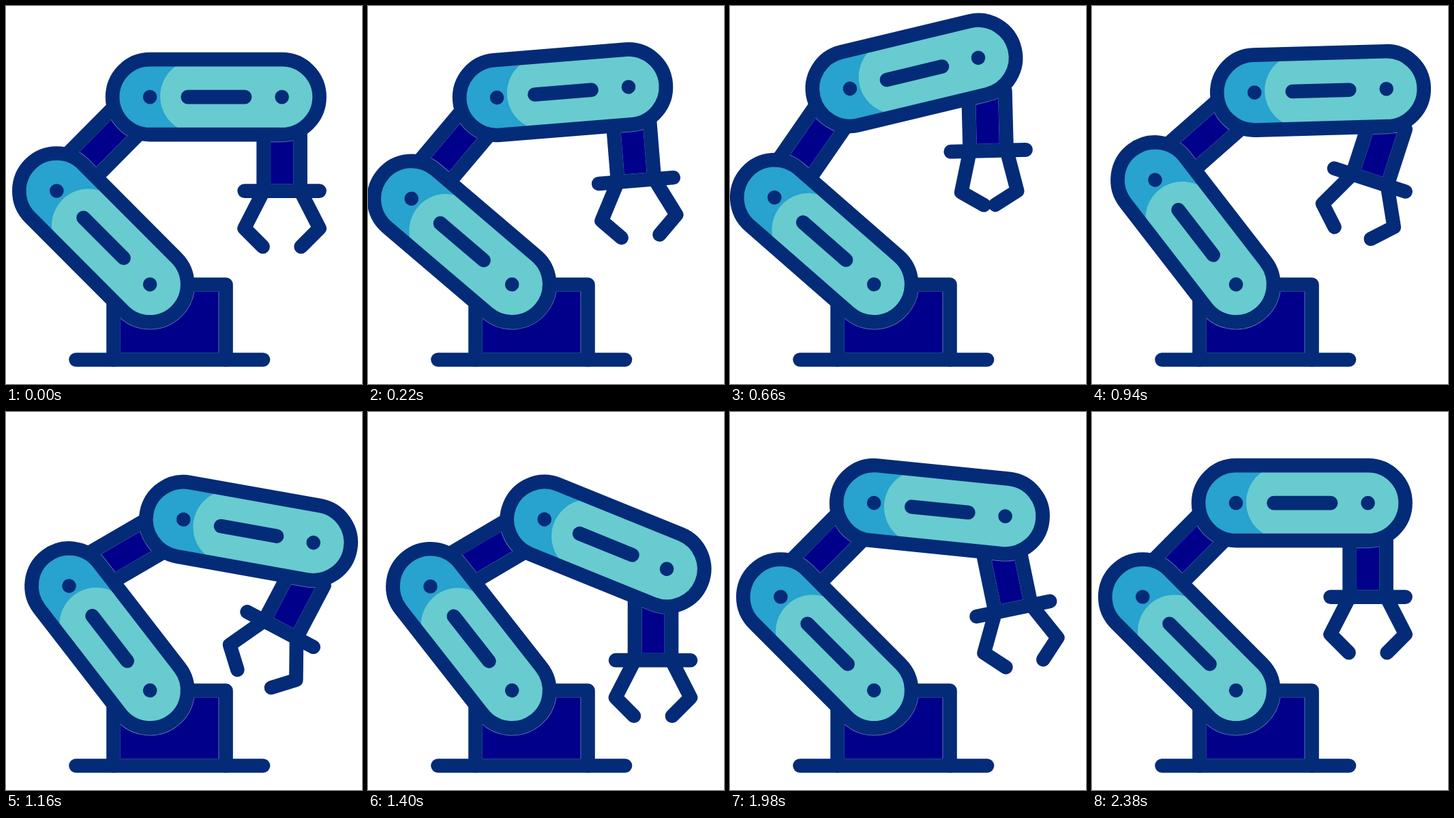
An HTML page with a canvas that plays this animation: 522 by 553 pixels, repeating every 2.4 s.

```html
<!DOCTYPE html>
<html>
<head>
<meta charset="utf-8">
<title>Robot arm</title>
<style>
html, body { margin: 0; width: 100%; height: 100%; overflow: hidden; background: #fff; }
canvas { display: block; }
</style>
</head>
<body>
<canvas id="stage" width="522" height="553"></canvas>
<script>
const ctx = document.getElementById('stage').getContext('2d');
const LOOP = 2400, ARM = 193.5, RADIUS = 55, LINE = 20.6;
const NAVY = '#042b77', DARK = '#00008b', TEAL = '#67cbd0', BLUE = '#28a2ce', EDGE = '#7580bb';

// The arm makes three strokes; each joint follows the one before it by a lag
const strokes = [
  { start: 0, span: 280, lag: 238, lower: -5.2, link: -6.2, upper: -5.5, grip: 19.6 },
  { start: 595, span: 330, lag: 250, lower: 7.2, link: 7.9, upper: 8.1, grip: -24.6 },
  { start: 1345, span: 400, lag: 235, lower: 0, link: 0, upper: 0, grip: 0 }
];
const lags = { lower: 0, link: 1, upper: 2.1, grip: 2.1 };

function ease(u) {
  u = Math.min(1, Math.max(0, u));
  return u * u * (3 - 2 * u);
}

function jointAngle(joint, time) {
  let angle = 0;
  for (const s of strokes) {
    const u = (time - s.start - lags[joint] * s.lag) / s.span;
    angle += (s[joint] - angle) * ease(u);
  }
  return angle;
}

// Fingers close and open again around two moments
const pinch = time => 17 * (ease(1 - Math.abs(time - 720) / 220) + ease(1 - Math.abs(time - 1680) / 220));

const rotate = degrees => ctx.rotate(degrees * Math.PI / 180);

function line(...points) {
  ctx.beginPath();
  for (let i = 0; i < points.length; i += 2) ctx.lineTo(points[i], points[i + 1]);
  ctx.strokeStyle = NAVY;
  ctx.lineWidth = LINE;
  ctx.stroke();
}

function disc(x, y, r, color) {
  ctx.beginPath();
  ctx.arc(x, y, r, 0, 7);
  ctx.fillStyle = color;
  ctx.fill();
}

function pillPath() {
  ctx.beginPath();
  ctx.roundRect(-RADIUS, -RADIUS, ARM + 2 * RADIUS, 2 * RADIUS, RADIUS);
}

// Dark panel with a thin light edge, also where pills overlap it
function panel(x, y, w, h, ...pillFrames) {
  ctx.save();
  ctx.beginPath();
  ctx.rect(x, y, w, h);
  ctx.fillStyle = DARK;
  ctx.fill();
  ctx.strokeStyle = EDGE;
  ctx.lineWidth = 1;
  ctx.stroke();
  ctx.clip();
  ctx.lineWidth = LINE + 1.5;
  for (const frame of pillFrames) {
    ctx.setTransform(frame);
    pillPath();
    ctx.stroke();
  }
  ctx.restore();
}

function pill(frame, shadeY) {
  ctx.save();
  ctx.setTransform(frame);
  pillPath();
  ctx.fillStyle = BLUE;
  ctx.fill();
  ctx.save();
  ctx.clip();
  disc(69, shadeY, 54, TEAL);
  ctx.fillRect(69, -60, 200, 120);
  ctx.restore();
  pillPath();
  ctx.strokeStyle = NAVY;
  ctx.lineWidth = LINE;
  ctx.stroke();
  disc(0, 0, 10.3, NAVY);
  disc(ARM, 0, 10.3, NAVY);
  line(55.5, 0, 139, 0);
  ctx.restore();
}

function draw(time) {
  ctx.resetTransform();
  ctx.clearRect(0, 0, 522, 553);
  ctx.lineCap = ctx.lineJoin = 'round';

  // Joint frames
  ctx.translate(211, 407.2);
  rotate(jointAngle('lower', time));
  ctx.translate(-136.7, -136.7);
  const elbow = ctx.getTransform();
  rotate(45);
  const lowerFrame = ctx.getTransform();
  ctx.setTransform(elbow);
  rotate(jointAngle('link', time));
  const linkJoint = ctx.getTransform();
  ctx.translate(136.8, -137.4);
  rotate(jointAngle('upper', time));
  const upperFrame = ctx.getTransform();
  ctx.translate(ARM, 53.5);
  rotate(jointAngle('grip', time));
  const gripFrame = ctx.getTransform();

  // Base
  ctx.resetTransform();
  panel(167.5, 417.5, 144.5, 90, lowerFrame);
  line(157.5, 517.5, 157.5, 407.5, 322.5, 407.5, 322.5, 517.5);
  line(102.5, 517.5, 377, 517.5);

  // Link between the arms
  ctx.setTransform(linkJoint);
  rotate(-45.2);
  panel(20, -17, 150, 34, lowerFrame, upperFrame);
  for (const y of [-27, 27]) line(30, y, 165, y);

  // Gripper
  ctx.setTransform(gripFrame);
  panel(-17, -10, 34, 84, upperFrame);
  line(-55, 84, 55, 84);
  for (const side of [1, -1]) {
    ctx.save();
    ctx.scale(side, 1);
    line(-27, -3, -27, 84);
    ctx.translate(-27, 84);
    rotate(-pinch(time));
    line(0, 0, -28, 54.5, -1, 81.5);
    ctx.restore();
  }

  pill(lowerFrame, 3);
  pill(upperFrame, -1);
}

const begin = performance.now();
function tick() {
  draw((performance.now() - begin) % LOOP);
  requestAnimationFrame(tick);
}
tick();
</script>
</body>
</html>
```
